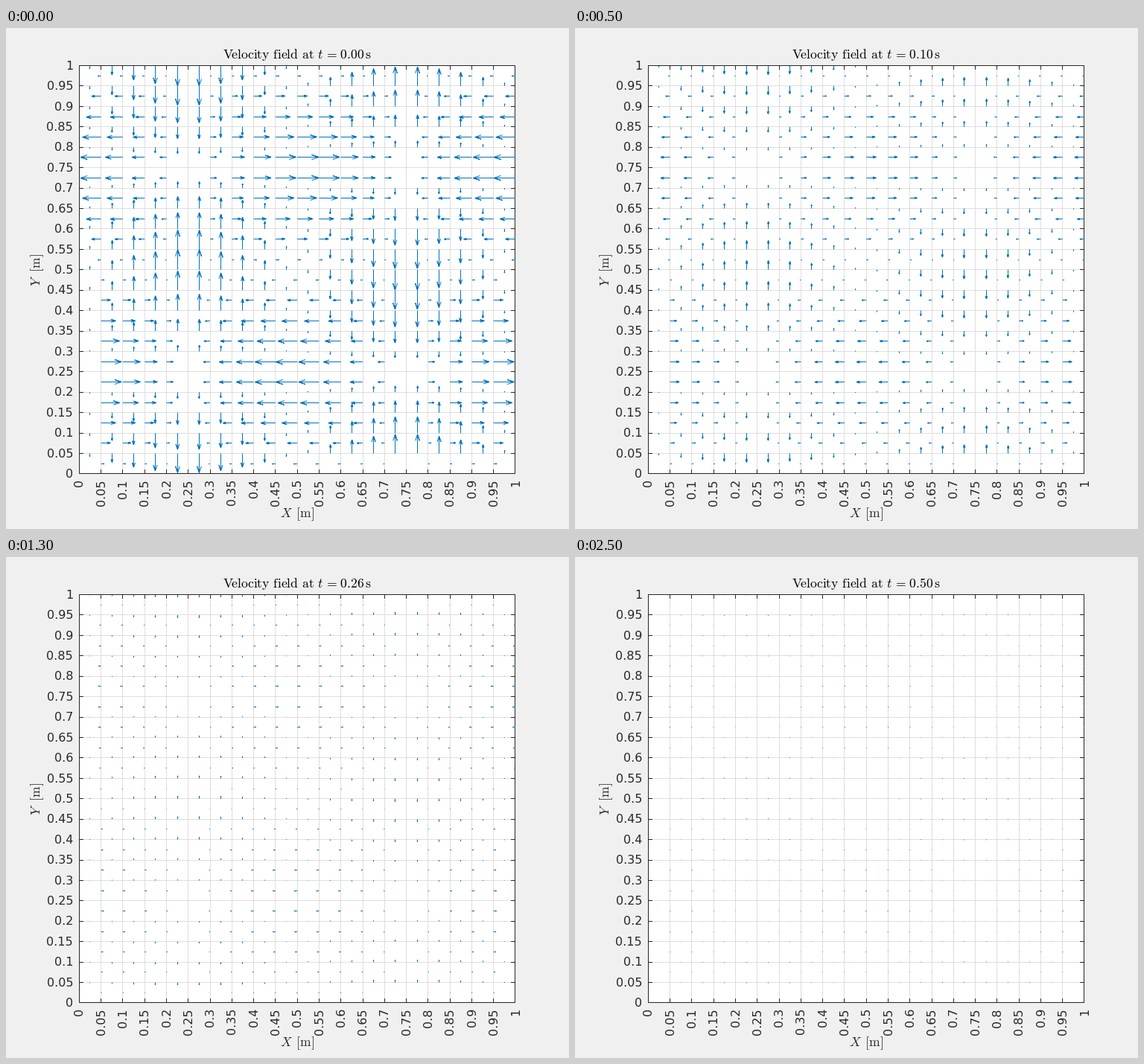
A matplotlib script for the animation above (2600 ms loop, 756 by 673 pixels).

```python
import numpy as np
import matplotlib.pyplot as plt
from matplotlib.animation import FuncAnimation
from matplotlib.collections import LineCollection
from matplotlib.patches import Rectangle

W, H, DPI = 756, 673, 100
PX = 72 / DPI  # one pixel in points
LEFT, RIGHT, TOP, BOTTOM = 98.3, 684.0, 50.5, 599.0
INK, BLUE = "#262626", "#0072BD"
CELLS, FRAMES, STEP = 20, 26, 0.02
VISCOSITY = 0.1
HEAD, SPREAD = 0.33, 0.33

plt.rcParams.update({"font.family": "DejaVu Sans", "mathtext.fontset": "cm"})


def px_x(x):
    return LEFT + x * (RIGHT - LEFT)


def px_y(y):
    return BOTTOM - y * (BOTTOM - TOP)


def crisp(p):
    """Centre of the pixel that holds p."""
    return np.floor(p) + 0.5


def add_lines(segments, color, zorder):
    lines = LineCollection(segments, colors=color, linewidths=PX, zorder=zorder,
                           capstyle="butt", joinstyle="bevel")
    lines.set_snap(False)  # positions are already on pixel centres
    return stage.add_collection(lines)


def add_box(zorder, **kw):
    return stage.add_patch(Rectangle((x0, y0), x1 - x0, y1 - y0, lw=PX,
                                     snap=False, zorder=zorder, **kw))


def add_text(x, y, text, size, **kw):
    return stage.text(x, y, text, size=size * PX, rotation_mode="anchor",
                      va="baseline", **kw)


fig = plt.figure(figsize=(W / DPI, H / DPI), dpi=DPI, facecolor="#f0f0f0")
stage = fig.add_axes([0, 0, 1, 1])
stage.set(xlim=(0, W), ylim=(H, 0))
stage.axis("off")

# Plot box, grid, ticks and tick labels
x0, x1, y0, y1 = crisp(np.array([LEFT, RIGHT - 0.5, TOP, BOTTOM - 0.5]))
box = add_box(0, fc="white", ec="none")

ticks = np.arange(CELLS + 1) / CELLS
cols = np.clip(crisp(px_x(ticks)), x0, x1)
rows = np.clip(crisp(px_y(ticks)), y0, y1)
add_lines([[(c, y0), (c, y1)] for c in cols]
          + [[(x0, r), (x1, r)] for r in rows], "#dedede", 1)

TICK = 5.5
marks = [[(c, y), (c, y + d)] for c in cols for y, d in ((y0, TICK), (y1, -TICK))]
marks += [[(x, r), (x + d, r)] for r in rows for x, d in ((x0, TICK), (x1, -TICK))]
add_lines(marks, INK, 2)
add_box(2, fc="none", ec=INK)

HALF_DIGIT = 5.2
for value in ticks:
    label = f"{value:g}"
    add_text(px_x(value) + HALF_DIGIT, 606, label, 16, rotation=90, ha="right",
             color=INK)
    add_text(90, px_y(value) + HALF_DIGIT, label, 16, ha="right", color=INK)

# Word space and relation space as TeX sets them
WORD, REL = r"\hspace{0.38}", r"\hspace{0.116}"
TITLE = (rf"$\mathrm{{V\hspace{{-0.095}}elocity{WORD}field{WORD}at{WORD}}}"
         rf"t{REL}={REL}%.2f\hspace{{0.19}}\mathrm{{s}}$")
mid_x, mid_y = (LEFT + RIGHT) / 2, (TOP + BOTTOM) / 2
title = add_text(mid_x, 41, "", 17.6, ha="center")
add_text(mid_x, 657, r"$X\hspace{0.47}\mathrm{[m]}$", 17.6, ha="center", color=INK)
add_text(46, mid_y, r"$Y\hspace{0.63}\mathrm{[m]}$", 17.6, ha="center", color=INK,
         rotation=90)

# Staggered grid: u on vertical cell faces, v on horizontal ones
faces = np.arange(1, CELLS + 1) / CELLS
centres = faces - 0.5 / CELLS
xu, yu = (a.ravel() for a in np.meshgrid(faces, centres))
xv, yv = (a.ravel() for a in np.meshgrid(centres, faces))
k = 2 * np.pi
u = np.cos(k * xu) * np.sin(k * yu) / CELLS * (RIGHT - LEFT)
v = np.sin(k * xv) * np.cos(k * yv) / CELLS * (BOTTOM - TOP)  # down is positive

tails = np.concatenate([
    np.column_stack([px_x(xu), crisp(px_y(yu))]),
    np.column_stack([crisp(px_x(xv)), px_y(yv)]),
])
flow = np.concatenate([
    np.column_stack([u, 0 * u]),
    np.column_stack([0 * v, v]),
])
side = flow[:, ::-1] * SPREAD

arrows = add_lines([], BLUE, 3)
arrows.set_clip_path(box)


def draw(frame):
    t = frame * STEP
    decay = np.exp(-2 * k**2 * VISCOSITY * t)
    tips = tails + flow * decay
    wing_a = tips - HEAD * (flow + side) * decay
    wing_b = tips - HEAD * (flow - side) * decay
    arrows.set_segments(np.stack([tails, tips, wing_a, tips, wing_b], axis=1))
    title.set_text(TITLE % t)
    return arrows, title


anim = FuncAnimation(fig, draw, frames=FRAMES, interval=100, repeat=True,
                     repeat_delay=0, blit=False)
plt.show()
```
